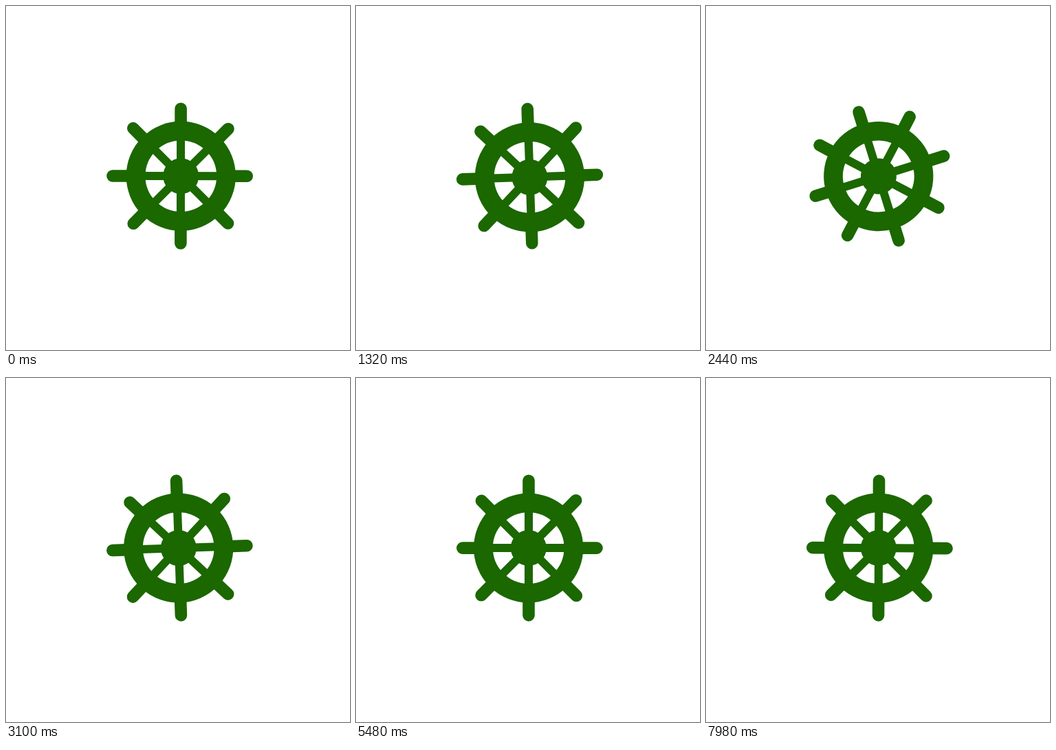
Write an HTML page that moves like this. It is 500 px wide and 500 px high and loops after 8 s.

```html
<!DOCTYPE html>
<html lang="en">
<head>
<meta charset="utf-8">
<title>Ship's wheel</title>
<style>
  html, body { margin: 0; width: 100%; height: 100%; overflow: hidden; background: #fff; }
  svg { display: block; width: 100vw; height: 100vh; }
  .wheel { fill: none; stroke: #1b6700; }
  .hub { fill: #1b6700; stroke: none; }
  .spokes { stroke-width: 12; }
  .handles { stroke-width: 17.6; stroke-linecap: round; }
</style>
</head>
<body>
<svg viewBox="0 0 500 500">
  <g class="wheel" id="wheel">
    <circle cx="254.3" cy="247.2" r="65.7" stroke-width="27.8"/>
    <circle class="hub" cx="254.2" cy="247.2" r="26"/>
    <path class="spokes" d="M254 185V310M190 247.1H316M208 201L300 293M300 201.4L208 293.4"/>
    <path class="handles" d="M254 182V149.3M254 312V345M190 247.1H155M318 247.1H350.2
      M208 201L184.7 177.7M300 201.4L322.9 178.5M208 293.4L185.3 316.4M300 293L322.6 315.8"/>
  </g>
</svg>
<script>
  const LOOP = 8, REST = 6, HALF = 180;
  const SPEED = 200 / 3;          // degrees per second while cruising
  const BRAKE = 2.44, GLIDE = 3.1;
  const DRIFT = 2 / (REST - GLIDE) ** 5;
  const wheel = document.getElementById('wheel');

  const drift = t => HALF - DRIFT * (REST - t) ** 5;

  function hermite(a, va, b, vb, span, u) {
    const w = 1 - u;
    return w * w * ((1 + 2 * u) * a + u * span * va) +
           u * u * ((3 - 2 * u) * b - w * span * vb);
  }

  function angle(t) {
    if (t < BRAKE) return SPEED * t;
    if (t >= GLIDE) return drift(t);
    const span = GLIDE - BRAKE;
    const endSpeed = 5 * DRIFT * (REST - GLIDE) ** 4;
    return hermite(SPEED * BRAKE, SPEED, drift(GLIDE), endSpeed, span, (t - BRAKE) / span);
  }

  function draw(now) {
    const t = (now / 1000) % LOOP;
    wheel.setAttribute('transform', `rotate(${angle(t).toFixed(4)} 252.5 247.1)`);
  }

  const start = performance.now();
  function tick() {
    draw(performance.now() - start);
    requestAnimationFrame(tick);
  }
  tick();
</script>
</body>
</html>
```
